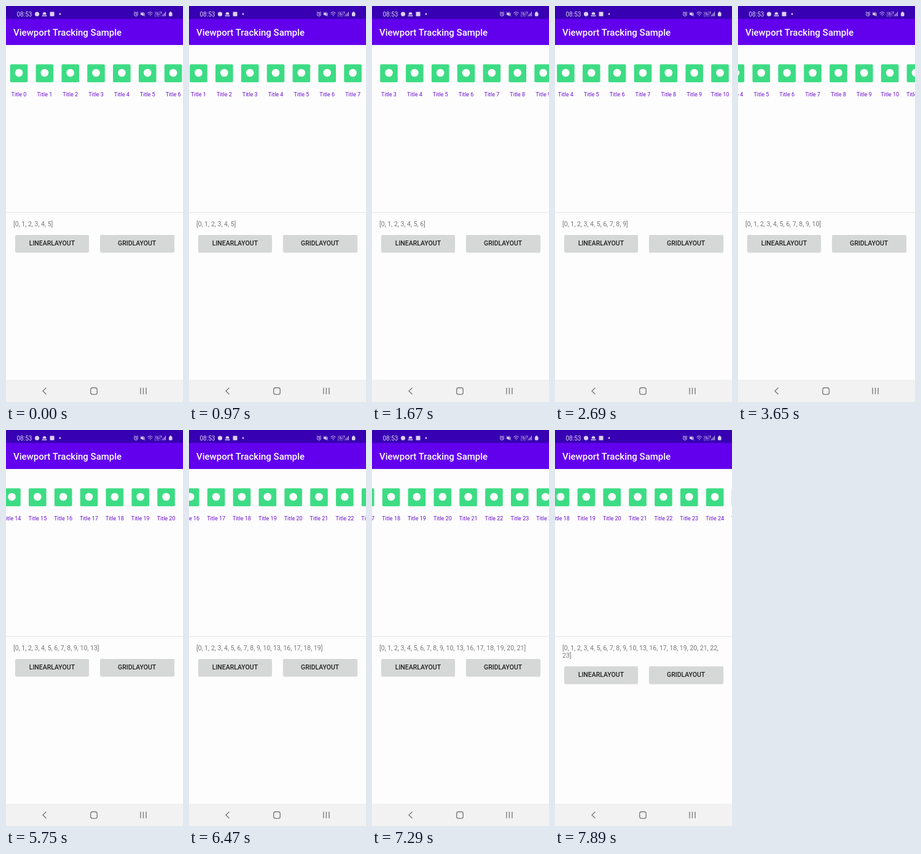
Write an HTML page that moves like this. It is 288 by 640 pixels and loops after 7.99 s.

```html
<!DOCTYPE html>
<html lang="en">
<head>
<meta charset="utf-8">
<title>Viewport Tracking Sample</title>
<style>
  html, body { margin: 0; width: 100%; height: 100%; overflow: hidden; }
  body { position: relative; background: #fdfdfd; font-family: Roboto, sans-serif; }
  svg { position: absolute; left: 0; top: 0; }
  #panel { position: absolute; left: 12px; top: 347px; width: 264px; }
  #seen { font-size: 10.5px; line-height: 12.3px; color: #777; }
  .buttons { display: flex; gap: 17.5px; margin: 10.7px 2.5px 0; }
  .buttons div {
    flex: 1; height: 28px; border-radius: 2px; background: #d6d7d7;
    box-shadow: 0 1px 1px #e2e2e2; color: #212121;
    font: 500 10.5px/28.5px Roboto, sans-serif; text-align: center;
  }
</style>
</head>
<body>
<svg width="288" height="640" viewBox="0 0 288 640">
  <rect y="604" width="288" height="36" fill="#f2f2f2"/>
  <rect width="288" height="21" fill="#3700b3"/>
  <rect y="21" width="288" height="42" fill="#6200ee"/>
  <text x="12" y="48" font-size="15" font-weight="500" fill="#fff">Viewport Tracking Sample</text>

  <g fill="#dcd2ee">
    <text x="17.5" y="16.7" font-size="10">08:53</text>
    <circle cx="50.5" cy="13" r="3.6"/>
    <path d="M59.5 14a3 4 0 0 1 6 0zM58.5 15h8v1.6h-8z"/>
    <rect x="71.5" y="9.5" width="7" height="7"/>
    <circle cx="88" cy="13" r="1.4"/>
    <path d="M219 11.5h2l2.5-2v7l-2.5-2h-2zM253 16.5h1v-1h-1zM255 16.5h1v-3h-1zM257 16.5h1v-5h-1zM259 16.5h1v-7h-1z"/>
    <text x="242" y="12.5" font-size="4.5">VoLTE</text>
    <text x="242" y="17" font-size="4.5">LTE1</text>
    <rect x="265" y="10.5" width="5.5" height="6" rx="1"/>
    <rect x="266.5" y="9.3" width="2.5" height="2"/>
  </g>
  <g fill="none" stroke="#dcd2ee">
    <circle cx="211.5" cy="13.3" r="2.9"/>
    <path d="M211.5 11.5v2h1.5M208 10.5l1.5-1.5M215 10.5l-1.5-1.5M219 9.5l7 7M225 11v4"/>
    <path d="M230.500 11.500q4-3.500 8 0M232 13.500q2.500-2 5 0M234 15.500h1.500"/>
  </g>

  <g id="row" font-size="9" text-anchor="middle"></g>
  <path d="M0 333.5h288" stroke="#e4e4e4"/>

  <g fill="none" stroke="#7c7c7c" stroke-width="1.4">
    <path d="M65.5 617l-5.5 5.3 5.5 5.3M219 617v10.5M223.5 617v10.5M228 617v10.5"/>
    <rect x="137.7" y="617" width="10.6" height="10.6" rx="3.2"/>
  </g>
</svg>
<div id="panel">
  <div id="seen"></div>
  <div class="buttons"><div>LINEARLAYOUT</div><div>GRIDLAYOUT</div></div>
</div>

<script>
const LOOP = 7990, WIDTH = 288, PITCH = 41.85, COUNT = 27;
const DRAG = 400, DECAY = 0.00083;
const FIRST = 500, SECOND = 4270;
const missed = [11, 12, 14, 15]; // left the screen too soon

const row = document.getElementById('row');
const seen = document.getElementById('seen');

for (let i = 0; i < COUNT; i++) {
  const x = 21 + i * PITCH;
  row.innerHTML += `<rect x="${x - 14.3}" y="94.3" width="28.6" height="29" rx="2" fill="#3ddc84"/>
    <circle cx="${x}" cy="108" r="6.3" fill="#fff"/>
    <text x="${x}" y="145.7" fill="#6b10cc">Title ${i}</text>`;
}

// A finger drag that speeds up, then a coast that dies away
function swipe(t, drag, coast) {
  if (t <= 0) return 0;
  if (t < DRAG) return drag * (t / DRAG) ** 1.5;
  return drag + coast * (1 - Math.exp(-DECAY * (t - DRAG)));
}

// The second touch stops the first coast
const scrollAt = t =>
  swipe(Math.min(t, SECOND) - FIRST, 37.5, 172.5) + swipe(t - SECOND, 104.5, 495.5);

// An item joins the list some time after it is fully in view
function joinTime(i) {
  if (i < 6) return 0;
  let t = 0;
  while (t < LOOP && scrollAt(t) < (i + 1) * PITCH - WIDTH) t += 5;
  return t + 740 + 11.5 * i;
}

const joins = Array.from({ length: COUNT }, (_, i) => joinTime(i));

function draw(t) {
  row.setAttribute('transform', `translate(${-scrollAt(t)} 0)`);
  const items = [...joins.keys()].filter(i => t >= joins[i] && !missed.includes(i));
  seen.textContent = `[${items.join(', ')}]`;
}

const start = performance.now();
function tick() {
  draw((performance.now() - start) % LOOP);
  requestAnimationFrame(tick);
}
tick();
</script>
</body>
</html>
```
